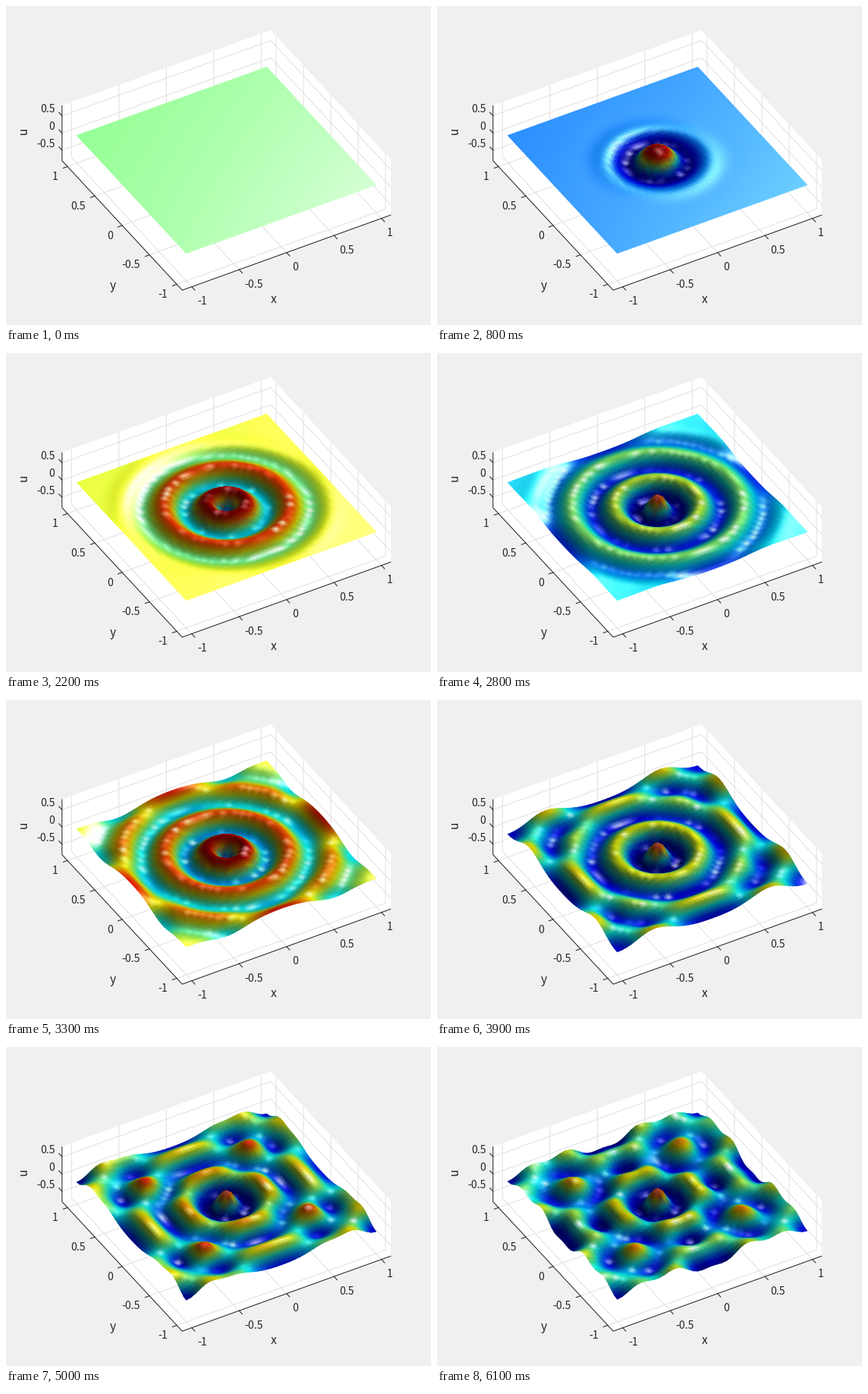
Write a matplotlib script that moves like this. It is 560 px wide and 420 px high and loops after 6.2 s.

```python
import matplotlib.pyplot as plt
import numpy as np
from matplotlib.animation import FuncAnimation

W, H, DPI = 560, 420, 100
FRAMES, INTERVAL = 62, 100
FONT = "Noto Sans CJK JP"
DARK = "#262626"
LIM, ZLIM = 1.1, 0.8

# Wave: an oscillating point source in a square with reflecting walls
PERIOD = 11.2            # frames per oscillation
WAVELENGTH = 0.39
WARMUP = 14              # frames of slow build-up before the start
SUBSTEPS = 3
N, SKIP = 81, 2          # solver nodes per side, every second one is drawn
SIGMA, FORCE = 0.05, 2.3

LIGHT = np.array([0.48, 0, 0.877])
EYE = 9 * np.array([-0.39, -0.68, 1.55])


def project(x, y, z):
    return 290 + 125 * x - 72 * y, 202.5 - 45 * x - 77.5 * y - 45.5 * z


def source(k):
    ramp = 1 / (1 + np.exp(-(k + 1.5) / 1.9))
    return FORCE * ramp * np.cos(2 * np.pi * (k - 33) / PERIOD + 3.73)


def solve():
    """Heights of the surface for every frame."""
    axis = np.linspace(1, -1, N)
    x, y = np.meshgrid(axis, axis)
    blob = np.exp(-(x**2 + y**2) / (2 * SIGMA**2)) / (2 * np.pi * SIGMA**2)
    h = 2 / (N - 1)
    dt = WAVELENGTH / PERIOD / SUBSTEPS
    u = np.zeros((N, N))
    old = u.copy()
    out = []
    for step in range((WARMUP + FRAMES) * SUBSTEPS):
        k = step / SUBSTEPS - WARMUP
        if k >= 0 and step % SUBSTEPS == 0:
            flat = k < 2
            out.append(u[::SKIP, ::SKIP] * (0 if flat else 1))
        p = np.pad(u, 1, mode="reflect")
        lap = (p[2:, 1:-1] + p[:-2, 1:-1] + p[1:-1, 2:] + p[1:-1, :-2] - 4 * u) / h**2
        u, old = 2 * u - old + dt**2 * (lap + blob * source(k)), u
    return out


def jet(v):
    return np.stack([np.clip(1.5 - np.abs(4 * v - c), 0, 1) for c in (3, 2, 1)], axis=-1)


def unit(v):
    return v / np.linalg.norm(v, axis=-1, keepdims=True)


def shade(u):
    """Colour map stretched to the range of u, lit at every node."""
    span = np.ptp(u)
    base = jet((u - u.min()) / span if span > 0 else np.full_like(u, 0.5))
    gy, gx = np.gradient(u, nodes[1] - nodes[0])
    normal = unit(np.stack([-gx, -gy, np.ones_like(u)], axis=-1))
    view = unit(EYE - np.stack([X, Y, u], axis=-1))
    facing = normal @ LIGHT
    mirror = 2 * facing[..., None] * normal - LIGHT
    diffuse = 0.3 + 0.6 * np.clip(facing, 0, 1)
    shine = 0.9 * np.clip((mirror * view).sum(axis=-1), 0, 1) ** 10
    return np.clip(base * diffuse[..., None] + shine[..., None], 0, 1)


def path(points, color, width, z):
    px, py = zip(*(project(*p) for p in points))
    ax.plot(px, py, color=color, lw=width, zorder=z, solid_capstyle="butt")


def tick(point, direction):
    px, py = project(*point)
    dx, dy = direction
    ax.plot([px, px + 6 * dx], [py, py + 6 * dy], color=DARK, lw=0.75, zorder=5)
    return px, py


def label(x, y, text, ha="center", size=14, **kw):
    ax.text(x, y, text, ha=ha, va="center_baseline", family=FONT,
            fontsize=size * 72 / DPI, color=DARK, zorder=6, **kw)


def draw_box():
    a, b = LIM, ZLIM
    outline = [(-a, a, b), (a, a, b), (a, -a, b), (a, -a, -b), (-a, -a, -b), (-a, a, -b)]
    ax.fill(*zip(*(project(*p) for p in outline)), color="white", lw=0, zorder=0)
    for t in (-1, -0.5, 0, 0.5, 1):
        path([(t, -a, -b), (t, a, -b), (t, a, b)], "#dfdfdf", 0.7, 1)
        path([(-a, t, -b), (a, t, -b), (a, t, b)], "#dfdfdf", 0.7, 1)
        px, py = tick((t, -a, -b), (0.68, 0.73))
        label(px + 7.5, py + 18.2, f"{t:g}", "left")
        px, py = tick((-a, t, -b), (-0.94, 0.34))
        label(px - 12, py + 12.2, f"{t:g}", "right")
    for t in (-0.5, 0, 0.5):
        path([(-a, a, t), (a, a, t), (a, -a, t)], "#dfdfdf", 0.7, 1)
        px, py = tick((-a, a, t), (-0.68, -0.73))
        label(px - 9.5, py - 9.5, f"{t:g}", "right")
    path([(-a, a, b), (-a, a, -b), (-a, -a, -b), (a, -a, -b)], DARK, 0.75, 5)
    label(352, 384, "x", size=15.5)
    label(140, 366, "y", size=15.5)
    label(22.5, 166, "u", size=15.5, rotation=90)


fig = plt.figure(figsize=(W / DPI, H / DPI), dpi=DPI, facecolor="#f0f0f0")
ax = fig.add_axes([0, 0, 1, 1])
ax.set_axis_off()
ax.set_xlim(-0.5, W - 0.5)
ax.set_ylim(H - 0.5, -0.5)
ax.set_autoscale_on(False)

# Nodes run from the far corner to the near one, so nearer cells cover farther ones
nodes = np.linspace(1, -1, N)[::SKIP]
X, Y = np.meshgrid(nodes, nodes)
heights = solve()
draw_box()
surface = []


def update(k):
    while surface:
        surface.pop().remove()
    u = heights[k]
    surface.append(ax.pcolormesh(*project(X, Y, u), shade(u), shading="gouraud", zorder=3))
    return surface


anim = FuncAnimation(fig, update, frames=FRAMES, init_func=lambda: [],
                     interval=INTERVAL, repeat=True, repeat_delay=0)
plt.show()
```
